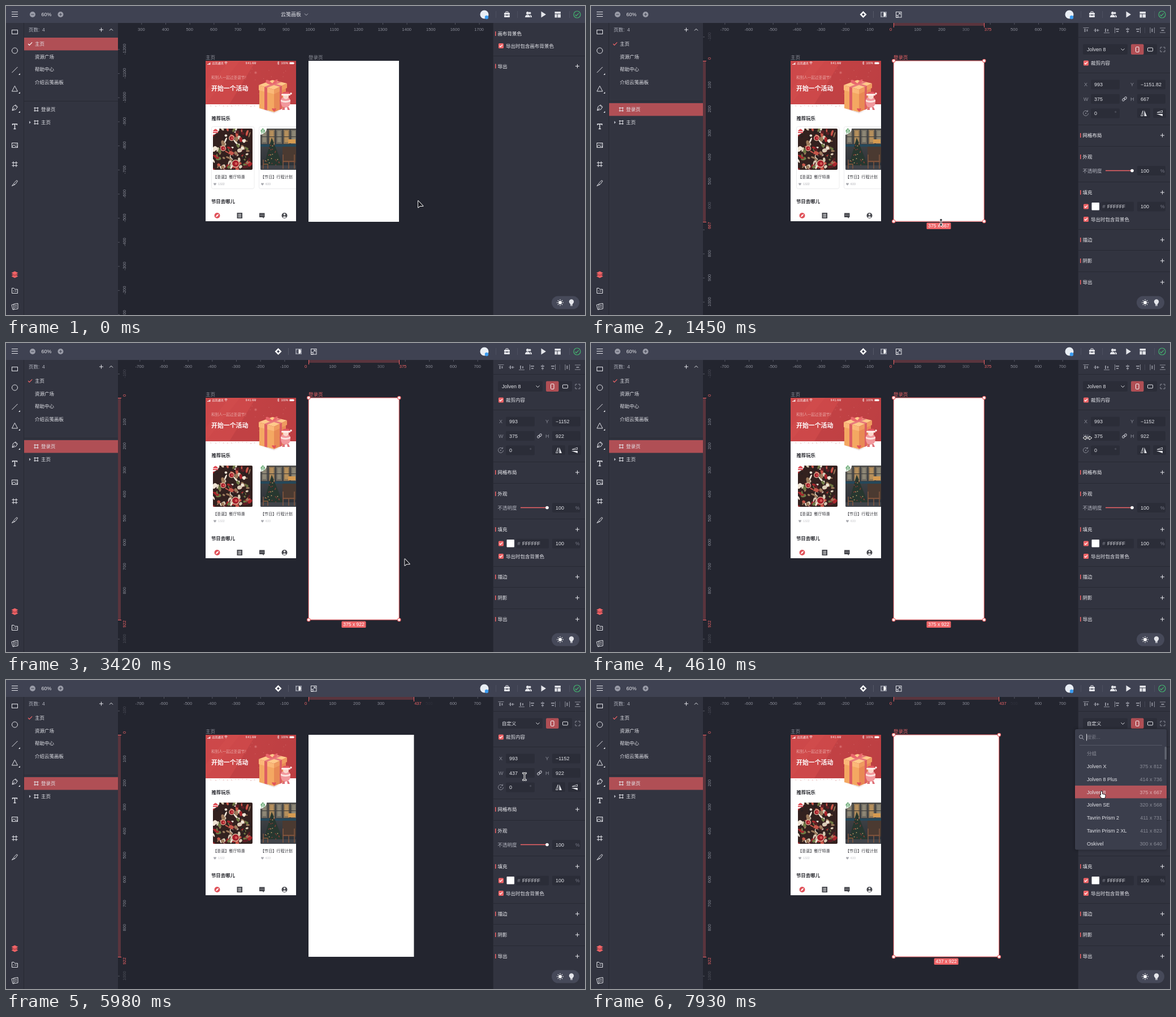
Write an HTML page with a canvas that moves like this. It is 1024x547 px and loops after 8 s.

```html
<!DOCTYPE html>
<html lang="zh-CN">
<head>
<meta charset="utf-8">
<style>
html, body { margin: 0; width: 100%; height: 100%; overflow: hidden; background: #23252f; }
canvas { display: block; }
</style>
</head>
<body>
<canvas id="stage" width="1024" height="547"></canvas>
<script>
const g = document.getElementById('stage').getContext('2d');
const FONT = '"Liberation Sans", "Noto Sans CJK SC", "Noto Sans CJK", sans-serif';
const LOOP = 8000, SCALE = 160 / 375, LEFT = 535, TOP = 97;
const RED = '#ef6467', ROW = '#b04f55', STRIP = '#5a343d', PANEL = '#323440', BAR = '#3f4252',
  BOARD = '#23252f', FIELD = '#2b2d38', EDGE = '#272933', INK = '#e4e5ea', DIM = '#8b8d98';

const STEPS = [0, 150, 300, 450, 600, 750, 950, 1150, 1300, 1450, 1900, 2050, 2230, 2430, 2610,
  3090, 3240, 3390, 3540, 3710, 3860, 4010, 4160, 4610, 4760, 4910, 5060, 5210, 5380, 5530,
  5980, 6130, 6280, 6430, 6580, 6730, 7030, 7180, 7330, 7480, 7630, 7780, 7930];
// time, x, y, shape
const CURSOR = [[0, 729, 345, 'arrow'], [600, 630, 330, 'arrow'], [950, 618, 372, 'arrow'],
  [1150, 619, 384, 'tall'], [1450, 619, 383, 'tall'], [1900, 620, 392, 'tall'], [2430, 631, 488, 'tall'],
  [2610, 631, 492, 'tall'], [3090, 636, 487, 'arrow'], [3540, 740, 330, 'arrow'], [4010, 872, 171, 'wide'],
  [4160, 872, 169, 'wide'], [4610, 878, 168, 'wide'], [5530, 917, 169, 'wide'], [5980, 917, 171, 'text'],
  [6280, 924, 128, 'arrow'], [6730, 922, 85, 'hand'], [7030, 922, 85, 'hand'], [7930, 905, 203, 'hand']];
const HEIGHT = [[0, 667], [1450, 667], [1900, 688], [2430, 912], [2610, 922]];
const WIDTH = [[0, 375], [4610, 375], [5530, 437]];
const DEVICES = [['Jolven X', '375 x 812'], ['Jolven 8 Plus', '414 x 736'], ['Jolven 8', '375 x 667'],
  ['Jolven SE', '320 x 568'], ['Tavrin Prism 2', '411 x 731'], ['Tavrin Prism 2 XL', '411 x 823'],
  ['Oskivel', '300 x 640']];

function track(keys, t, col = 1) {
  let i = 0;
  while (i < keys.length - 1 && keys[i + 1][0] <= t) i++;
  const a = keys[i], b = keys[i + 1];
  return b ? a[col] + (b[col] - a[col]) * (t - a[0]) / (b[0] - a[0]) : a[col];
}
function rect(x, y, w, h, c) { g.fillStyle = c; g.fillRect(x, y, w, h); }
function box(x, y, w, h, r, c, line) {
  g.beginPath(); g.roundRect(x, y, w, h, r);
  paint(c, line);
}
function disc(x, y, r, c, line) {
  g.beginPath(); g.arc(x, y, r, 0, 7);
  paint(c, line);
}
function paint(c, line) {
  if (line) { g.strokeStyle = c; g.lineWidth = line; g.stroke(); } else { g.fillStyle = c; g.fill(); }
}
function path(d, c, line, x = 0, y = 0) {
  const p = new Path2D(d);
  g.save(); g.translate(x, y);
  if (line) { g.strokeStyle = c; g.lineWidth = line; g.stroke(p); } else { g.fillStyle = c; g.fill(p); }
  g.restore();
}
function text(s, x, y, c = INK, size = 8.5, align = 'left', weight = 400) {
  g.font = `${weight} ${size}px ${FONT}`;
  g.textAlign = align; g.fillStyle = c;
  g.fillText(s, x, y + size * 0.36);
}
function clip(x, y, w, h, r, draw) {
  g.save(); g.beginPath(); g.roundRect(x, y, w, h, r); g.clip();
  draw(); g.restore();
}
function blend(x0, y0, x1, y1, ...colors) {
  const b = g.createLinearGradient(x0, y0, x1, y1);
  colors.forEach((c, i) => b.addColorStop(i / (colors.length - 1), c));
  return b;
}
function random(seed) {
  return () => (seed = seed * 16807 % 2147483647) / 2147483647;
}
const plus = (x, y) => path('M-3.5 0H3.5M0-3.5V3.5', INK, 1, x, y);
const chevron = (x, y, c = INK) => path('M-3-1.5L0 1.5L3-1.5', c, 1, x, y);
const tick = (x, y, c, k = 1) => path(`M${-3 * k} 0L${-k} ${2.2 * k}L${3.4 * k} ${-2.4 * k}`, c, 1.2, x, y);
const frameIcon = (x, y, s, c) => path(`M${-s} -2.5H${s}M${-s} 2.5H${s}M-2.5 ${-s}V${s}M2.5 ${-s}V${s}`, c, 1, x, y);

function checkbox(y, label) {
  box(871, y - 4.5, 9, 9, 1.5, RED);
  tick(875.3, y, '#fff', 0.8);
  if (label) text(label, 884, y);
}
function heading(y, label, add = true) {
  rect(865, y - 4, 1.5, 8, RED);
  text(label, 869.5, y, '#f4f4f7', 8.5, 'left', 500);
  if (add) plus(1010.5, y);
}
const divider = (...ys) => ys.forEach(y => rect(861, y, 163, 1, EDGE));

function ruler(vertical, zero, end) {
  const place = v => zero + v * SCALE;
  const label = (s, p, c) => {
    g.save();
    if (vertical) { g.translate(209, p); g.rotate(-Math.PI / 2); text(s, 0, 0, c, 7.5, 'center'); }
    else text(s, p, 41, c, 7.5, 'center');
    g.restore();
  };
  const stop = place(end);
  for (let v = -1900; v <= 1900; v += 100) {
    const p = place(v);
    if (p < (vertical ? 48 : 215) || p > 1024) continue;
    let a = vertical && p < 60 ? 0.4 : 1;
    // labels fade out close to the ends of the selection
    if (end) a *= Math.min(1, Math.max(0, (Math.min(Math.abs(p - zero), Math.abs(p - stop - 4)) - 20) / 22));
    g.globalAlpha = a;
    label(v, p, DIM);
    g.globalAlpha = 1;
    vertical ? rect(198, p, 3, 1, '#555763') : rect(p, 30, 1, 3, '#555763');
  }
  if (!end) return;
  if (vertical) {
    rect(198, zero, 5, stop - zero, STRIP);
    for (const y of [zero, Math.round(stop)]) rect(198, y, 6, 1, RED);
  } else {
    rect(zero, 30, stop - zero, 5, STRIP);
    for (const x of [zero, Math.round(stop)]) rect(x, 30, 1, 8, RED);
  }
  label('0', zero - (vertical ? 4 : 5), RED);
  label(end, stop + 7, RED);
}

function foodPhoto() {
  rect(366, 217, 70, 73, '#33211f');
  const r = random(77);
  const tones = ['#a9262c', '#d9cbb5', '#2b1f20', '#6f7a45', '#c8574a', '#efe4d4', '#5c1d24', '#9c7a5c'];
  for (let i = 0; i < 120; i++) {
    g.beginPath();
    g.ellipse(366 + r() * 70, 217 + r() * 73, 1.5 + r() * 4, 1 + r() * 2.5, r() * 3, 0, 7);
    paint(tones[i % 8]);
  }
  for (const [x, y, s] of [[399, 234, 5], [406, 279, 7], [384, 252, 5]]) {
    disc(x, y, s, '#e2c5a6'); disc(x, y, s - 1.2, '#a51e2b'); disc(x + 1, y, s / 3, '#d65a55');
  }
}
function streetPhoto() {
  rect(450, 217, 63, 73, blend(0, 217, 0, 290, '#4a4a49', '#3b3e42', '#2a2f36'));
  for (let i = 0; i < 5; i++) {
    rect(452 + i * 13, 219, 10, 25, i % 2 ? '#8d7454' : '#6f6a60');
    rect(454 + i * 13, 221, 6, 20, i % 2 ? '#b58f5c' : '#8c8675');
    rect(452 + i * 13, 231, 10, 1, '#39393a');
  }
  rect(450, 245, 63, 4, '#25485a');
  rect(489, 249, 24, 28, '#4b3a31'); rect(499, 236, 13, 7, '#d59a50');
  path('M470 233L455 286H491Z', '#27372f');
  const r = random(15);
  for (let i = 0; i < 26; i++) {
    const y = 244 + r() * 40;
    disc(471 + (r() - 0.5) * (y - 233) * 0.6, y, 0.9, i % 3 ? '#933c35' : '#c6a36c');
  }
  rect(450, 282, 63, 8, '#404349');
  path('M490 263V288M490 275H500V288M510 263V288M501 275H510M455 272V288M455 280H463V288', '#8e5b40', 1.3);
}
function gift() {
  path('M448 147L474 155V188L448 181Z', '#f4a862');
  path('M474 155L495 145V179L474 188Z', '#e88a55');
  path('M447 140L471 131L497 137L474 148Z', '#ffc98a');
  path('M447 140L474 148V156L447 149Z', '#fbb878');
  path('M474 148L497 137V145L474 156Z', '#ef9b60');
  path('M457 143L462 144.5V185L457 183.5ZM484 143L488 141V182L484 184Z', '#dd5f63');
  path('M457 143L482 133.5L487 135L462 144.5ZM459 135.5L463 134L488 141L484 143Z', '#e8797b');
  path('M471 139C458 140 457 129 463 131C468 133 470 137 471 139C474 129 483 128 480 133C478 137 475 138 471 139Z', '#e9676c');
  path('M486 168Q486 161 494 161Q503 161 503 169Q503 180 494 180Q486 180 486 168Z', '#f2989c');
  path('M486 166Q494 170 503 166V169Q494 173 486 169Z', '#fbe3df');
  disc(495, 160, 5, '#fbd8cd');
  path('M488 157Q489 151 496 152Q502 151 502 157Z', '#e1585f');
  box(487, 155.5, 16, 3, 1.5, '#fff4f0');
  disc(504, 155, 1.7, '#fff4f0');
  path('M490 179H493V184H488ZM497 179H500L502 184H498Z', '#de7077');
  path('M447 181L474 190L486 185L474 188Z', '#eadfe0');
  path('M474 187q-3-3-4-5q2-2 4 0q2-2 4 0q-1 3-4 5', '#e3545a');
}
function phone(t) {
  text('主页', 353, 91, '#8f919b');
  rect(353, TOP, 160, 284, '#fff');
  clip(353, TOP, 160, 284, 0, () => {
    rect(353, TOP, 160, 77, blend(353, 97, 513, 150, '#cd484a', '#cd4849', '#c54447'));
    path('M442 97H513V174H395Z', 'rgba(176,56,62,.4)');
    path('M353 150L395 97H414L353 174Z', 'rgba(222,90,88,.14)');
    const r = random(9);
    for (let i = 0; i < 16; i++) disc(432 + r() * 78, 108 + r() * 55, 0.5, '#d97a79');
    path('M439 118h5M441.5 115.5v5M439.7 116.2l3.6 3.6M443.3 116.2l-3.6 3.6', '#dd7d7d', 0.6);
    for (let i = 0; i < 12; i++) rect(360 + i * 7 + r() * 3, 175 + r() * 2, 2.4, 1 + r(), '#f0d3d2');

    for (let i = 0; i < 4; i++) rect(356 + i * 1.5, 103 - i, 1, 1 + i, '#fff');
    text('远岚通讯', 364.5, 101, '#fff', 5);
    path('M386.5 100Q389 97.5 391.5 100M387.5 101.5Q389 100 390.5 101.5M388.5 103H389.5', '#fff', 0.9);
    text('9:41 AM', 433, 101, '#fff', 5, 'center');
    path('M480 99.5L483 102.5L481.5 104V98L483 99.5L480 102.5', '#fff', 0.6);
    text('100%', 486.5, 101, '#fff', 5);
    box(501.5, 99.5, 7.5, 3.5, 0.6, '#fff'); rect(509.5, 100.5, 0.8, 1.5, '#fff');

    text('和别人一起过圣诞节！', 363, 127, '#eaa9a7', 6.6);
    text('开始一个活动', 363, 146, '#fff', 10.9, 'left', 700);
    gift();
    text('推荐玩乐', 363.5, 199, '#23242a', 8.4, 'left', 700);
    for (const [x, c, name, likes] of [[363, '#e0525a', '【圣诞】餐厅特惠', '1322'], [447, '#4f9a5c', '【节日】行程计划', '633']]) {
      if (t < 1900) box(x + 0.5, 213.5, 75.5, 110, 3, '#ececee', 1);
      clip(x + 3, 217, 70, 73, 2, x < 400 ? foodPhoto : streetPhoto);
      path('M0 0H12Q11 10 0 12Z', '#fff', 0, x + 2.5, 216);
      if (x < 400) path('M366 222Q367 218.5 370.5 217.5Q374 218.5 375 222ZM366 223H375V225H366Z', c);
      else {
        box(451.5, 218.5, 5.5, 5.5, 1.5, c, 1);
        rect(450.5, 220.5, 7.5, 1.5, c); rect(453, 217, 2.5, 1, c);
        rect(451.5, 224.5, 1.5, 1.2, c); rect(455.5, 224.5, 1.5, 1.2, c);
      }
      text(name, x + 3, 302, '#34353b', 7.1);
      path('M0 2.7C-4-.5-2-3 0-1.2C2-3 4-.5 0 2.7', '#a9aab0', 0, x + 6.5, 315);
      text(likes, x + 12, 315, t < 1900 ? '#abacb2' : '#c0c1c6', 5.3);
    }
    text('节日去哪儿', 363, 346, '#23242a', 8.4, 'left', 700);
    disc(373.5, 371, 5, '#e0525a'); path('M3-3L-1-1L-3 3L1 1Z', '#fff', 0, 373.5, 371);
    rect(408.5, 366, 9.5, 10, '#46474d');
    for (const y of [368.3, 370.6, 373]) rect(410.5, y, 5.5, 1, '#fff');
    path('M448 366.5H457.5V374H456V376L453.5 374H448Z', '#46474d');
    for (const x of [450, 452.3, 454.6]) rect(x, 369.7, 1, 1, '#fff');
    disc(492.5, 371, 5, '#46474d'); disc(492.5, 369, 1.7, '#fff');
    path('M489.3 374Q492.5 370.5 495.7 374Q492.5 376 489.3 374Z', '#fff');
  });
}

function artboard(t, w, h, picked) {
  const W = w * SCALE, H = h * SCALE, R = LEFT + W, B = TOP + H;
  const handles = picked && (t < 4760 || t >= 6130);
  if (!picked || handles) text('登录页', LEFT, 91, picked ? RED : '#8f919b');
  rect(LEFT, TOP, W, Math.round(H), '#fff');
  if (!handles) return;
  g.strokeStyle = RED; g.lineWidth = 1;
  g.strokeRect(LEFT + 0.2, TOP, W, H - 0.4);
  for (const x of [LEFT, R]) for (const y of [TOP, B - 0.4]) { disc(x + 0.3, y, 2.7, '#fff'); disc(x + 0.3, y, 2.7, RED, 1.1); }
  box(LEFT + W / 2 - 21.5, B + 2, 43, 11.5, 1.5, RED);
  text(`${w} x ${h}`, LEFT + W / 2, B + 7.8, '#fff', 8.5, 'center');
}

function leftSide(picked) {
  rect(0, 30, 198, 517, PANEL);
  rect(31, 30, 1, 517, EDGE);
  g.strokeStyle = INK; g.lineWidth = 1;
  g.strokeRect(10.5, 42.5, 10, 7);
  disc(15.5, 79, 5, INK, 1);
  path('M10.5 118L20.5 108', INK, 1);
  path('M15.5 141.5L20.5 151H10.5Z', INK, 1);
  path('M11 185L12.5 178L17 175L20.5 178.5L17.5 183ZM11 185L15.5 180.5M16 176L20 180', INK, 1);
  for (const y of [122, 155, 189]) path('M25 0V-3L22 0Z', INK, 0, 0, y);
  path('M11.5 211V209H19.5V211M15.5 209V217.5M13.5 217.5H17.5', INK, 1.4);
  g.lineWidth = 1;
  g.strokeRect(10.5, 242.5, 10, 8); path('M11 249L14 245.5L17 249L18.5 247.5L20.5 250', INK, 1); disc(18, 244.7, 0.8, INK);
  frameIcon(15.5, 280, 5, INK);
  path('M10.5 318.5L13.5 314.5L16 316ZM14 313.5L19 308.5L20.5 310L16.5 315.5', INK, 1);
  for (const y of [478.5, 475.5, 472.5]) path('M-6 0L0-3L6 0L0 3Z', y === 475.5 ? '#c94d52' : RED, 0, 15.5, y);
  path('M10.5 508.5V499.5H14L15.5 501.5H20.5V508.5ZM13 504.5H14.5M16 504.5H18.5', INK, 1);
  path('M14 527.5L21 526.5V536L14 537ZM14 528L10 529L12 537.5H14M16 530H19M16 533H19', INK, 1);

  text('页数:  4', 40, 42, '#b4b6c0');
  plus(168.5, 42); path('M183 43.5L186 40.5L189 43.5', INK, 1);
  rect(32, picked ? 172 : 56, 166, 22.5, ROW);
  tick(42.5, 67, picked ? RED : '#fff', 1.1);
  ['主页', '资源广场', '帮助中心', '介绍云笺画板'].forEach((s, i) => text(s, 51, 67 + i * 22.7));
  rect(32, 168, 166, 1, EDGE);
  frameIcon(53.5, 183, 4, INK); text('登录页', 62, 183);
  frameIcon(53.5, 206, 4, INK); text('主页', 62, 206);
  path('M41 203.5L44 206L41 208.5Z', '#b4b6c0');
}

function topBar(picked) {
  rect(0, 0, 1024, 30, BAR);
  for (const y of [10, 14, 18]) rect(10, y, 11, 1, INK);
  for (const x of [47, 96.5]) {
    disc(x, 15, 5, '#9a9ca8'); rect(x - 2.5, 14.5, 5, 1, BAR);
    if (x > 50) rect(x - 0.5, 12.5, 1, 5, BAR);
  }
  text('60%', 71.5, 15, INK, 9, 'center');
  if (picked) {
    path('M481.5 9L487.5 15L481.5 21L475.5 15ZM481.5 12.5L479 15L481.5 17.5L484 15Z', '#fff');
    rect(499, 9, 1, 12, '#565968');
    rect(512, 10, 11, 10, '#8f929f');
    disc(517.5, 15, 4, '#4a4d5c'); path('M517.5 11A4 4 0 0 1 517.5 19Z', '#fff');
    g.strokeStyle = INK; g.lineWidth = 1; g.strokeRect(539.5, 10.5, 9.5, 9.5);
    g.strokeRect(539.5, 16.5, 3.5, 3.5);
    path('M543.5 15.5L547 12.5M544 12.5H547V15.5', INK, 1);
  } else {
    text('云笺画板', 504, 15, INK, 9, 'center'); chevron(531, 15, '#b4b6c0');
  }
  disc(846, 15, 7.5, '#e9eef4'); disc(850, 20, 3.2, '#3c9cf0');
  for (const x of [866, 904, 996]) rect(x, 9, 1, 12, '#4d5060');
  box(881, 12, 10, 8, 1, INK); path('M884 12V10H888V12', INK, 1); rect(881, 15.5, 10, 0.8, BAR); rect(885, 15, 2, 2, BAR);
  disc(922.5, 12.5, 2.5, INK); disc(926.5, 12.5, 2, INK);
  path('M918 20Q918 15.5 922.5 15.5Q927 15.5 927 20ZM927.5 20H930Q930 16 926.5 15.5Q928 17.5 927.5 20Z', INK);
  path('M946.5 9.5L955 15L946.5 20.5Z', INK);
  rect(970.5, 10, 10.5, 3.5, INK); rect(970.5, 14.5, 4, 6, INK); rect(975.5, 14.5, 5.5, 6, INK);
  disc(1010, 15, 6, '#43b26f', 1.2); tick(1009.5, 15.3, '#43b26f');
}

function field(x, y, w, value, unit) {
  box(x, y - 8.5, w, 17, 2, FIELD);
  text(value, x + 6, y, INK, 9);
  if (unit) text(unit, x + w - 9, y, '#777986', 8.5);
}
function alignIcons() {
  const bars = (d, x) => path(d, DIM, 1, x, 43);
  const blocks = (d, x) => path(d, DIM, 0, x, 43);
  [-4.5, 0, 4.5].forEach((shift, i) => {
    bars(`M-5 ${shift}H5`, [875.5, 894, 912][i]);
    blocks('M-3-3H-1V3H-3ZM1-2H3V2H1Z', [875.5, 894, 912][i]);
    bars(`M${shift}-5V5`, [931, 949, 967][i]);
    blocks('M-3-3H3V-1H-3ZM-2 1H2V3H-2Z', [931, 949, 967][i]);
  });
  bars('M-3.5-5V5M4-5V5', 992.5); blocks('M-1-3H1V3H-1Z', 992.5);
  bars('M-5-4H5M-5 4H5', 1011); blocks('M-2.5-1H2.5V1H-2.5Z', 1011);
  rect(979, 38, 1, 10, '#454755');
}
function inspector(t, w, h) {
  alignIcons();
  divider(55, 118, 210, 248, 311, 395, 432, 470);
  const preset = w === 375;
  box(870, 67.5, 79, 18.5, 2, FIELD);
  text(preset ? 'Jolven 8' : '自定义', 877, 77, INK, preset ? 9 : 8.5);
  chevron(940.5, 77);
  box(955, 67.5, 46, 18.5, 2, FIELD); box(955, 67.5, 22.5, 18.5, 2, ROW);
  box(963.5, 72.5, 5.5, 9, 1, '#fff', 1); box(984.5, 74, 9, 6, 1, INK, 1);
  path('M1007 76V73H1010M1012 73H1015V76M1015 78V81H1012M1010 81H1007V78', DIM, 1);
  checkbox(101, '裁剪内容');
  for (const [s, x, y] of [['X', 872, 139], ['Y', 954, 139], ['W', 871, 164.5], ['H', 954, 164.5]]) text(s, x, y, DIM, 9);
  field(884, 139, 51, '993'); field(966, 139, 50, t < 1900 ? '−1151.82' : '−1152');
  field(884, 164.5, 51, w); field(966, 164.5, 50, h);
  g.save(); g.translate(943.5, 164.5); g.rotate(-0.7);
  box(-4.5, -1.7, 5, 3.4, 1.7, '#c5c6ce', 1); box(-0.5, -1.7, 5, 3.4, 1.7, '#c5c6ce', 1); g.restore();
  path('M878 186.5A4.5 4.5 0 1 0 879.5 190M878.5 184.5V187H876', DIM, 1); disc(875, 190, 1, DIM);
  field(884, 190, 51, '0', '°');
  box(966, 181, 23, 17, 2, FIELD); box(994, 181, 23, 17, 2, FIELD);
  path('M976 185.5V194.5H972.5Z', INK, 0.8); path('M978.5 184.5V195H983Z', INK);
  path('M1010.5 188.5H1001L1010.5 185Z', INK, 0.8); path('M1011 191H1000L1011 195Z', INK);
  heading(229, '网格布局'); heading(267, '外观', false);
  text('不透明度', 869.5, 291.5, '#b4b6c0');
  rect(910, 290.7, 47, 1.5, RED); disc(957, 291.5, 2.8, '#fff');
  field(966, 291.5, 50, '100', '%');
  heading(330, '填充');
  checkbox(355);
  box(885.5, 348, 13.5, 13.5, 1, '#fff');
  box(902, 346.5, 58, 17, 2, FIELD); text('#', 904.5, 355, DIM, 9); text('FFFFFF', 913, 355, INK, 8.7);
  field(966, 355, 50, '100', '%');
  checkbox(377.5, '导出时包含背景色');
  heading(414, '描边'); heading(451, '阴影'); heading(489, '导出');
}
function rightSide(t, w, h, picked) {
  rect(861, 30, 163, 517, PANEL);
  rect(861, 30, 1, 517, EDGE);
  if (picked) inspector(t, w, h);
  else {
    heading(49, '画布背景色', false); checkbox(70.5, '导出时包含画布背景色');
    divider(88); heading(106.5, '导出');
  }
  box(965, 513.5, 49, 23, 11.5, '#464959');
  disc(980, 525, 3, '#fff');
  for (let i = 0; i < 8; i++) disc(980 + 5 * Math.cos(i * Math.PI / 4), 525 + 5 * Math.sin(i * Math.PI / 4), 0.8, '#fff');
  disc(1000, 523.5, 4.2, INK); rect(998, 527, 4, 2, INK); rect(998, 529.7, 4, 1.2, INK);
}

function menu(pointerY) {
  g.save(); g.shadowColor = 'rgba(0,0,0,.4)'; g.shadowBlur = 5;
  box(856, 87, 162, 213.5, 3, '#3b3e4c'); g.restore();
  disc(866.5, 100.5, 3, '#b4b6c0', 1); path('M869 103L871.5 105.5', '#b4b6c0', 1);
  rect(876, 95.5, 1, 12, INK); text('搜索...', 876.5, 101, '#777986');
  rect(864, 115, 146, 1, '#555866');
  text('分组', 877, 130, DIM);
  const hover = Math.floor((pointerY - 5 - 141.1) / 22.8);
  if (hover >= 0) rect(856, 141.3 + hover * 22.8, 162, 22.5, '#b2535a');
  DEVICES.forEach(([name, size], i) => {
    const y = 152.7 + i * 22.8;
    text(name, 877, y, INK, 9);
    text(size, 1010, y, i === hover ? '#dfb4b8' : DIM, 9, 'right');
  });
  box(1014.5, 118, 3.5, 23, 1.7, '#60636f');
}

const SHAPES = {
  arrow: 'M0 0V11.5L3 9H8.5Z',
  tall: 'M0-6.5L2.5-3.5H.6V3.5H2.5L0 6.5L-2.5 3.5H-.6V-3.5H-2.5Z',
  wide: 'M-7 0L-3.5-2.5V-.6H3.5V-2.5L7 0L3.5 2.5V.6H-3.5V2.5Z',
  text: 'M-3-6.5H-1L0-5.5L1-6.5H3V-5.5H1L.6-5V5L1 5.5H3V6.5H1L0 5.5L-1 6.5H-3V5.5H-1L-.6 5V-5L-1-5.5H-3Z',
  hand: 'M-3-5Q-2-7-1-5V-1L3.5 0Q5 .5 4.500 3L3.5 6H-2L-5 1.5Q-4 0-3 1.5Z'
};
function cursor(t, x, y) {
  const kind = CURSOR.filter(k => k[0] <= t).pop()[3];
  const light = kind === 'hand';
  g.lineJoin = 'round';
  path(SHAPES[kind], light ? '#22232a' : '#fff', 1.8, x, y);
  path(SHAPES[kind], light ? '#fff' : '#191a20', 0, x, y);
  g.lineJoin = 'miter';
}

function draw(now) {
  const clock = now % LOOP;
  const t = STEPS.filter(s => s <= clock).pop();
  const w = Math.round(track(WIDTH, t)), h = Math.round(track(HEIGHT, t));
  const x = track(CURSOR, t), y = track(CURSOR, t, 2);
  const picked = t >= 600;
  rect(0, 0, 1024, 547, BOARD);
  if (picked) { ruler(false, LEFT, w); ruler(true, TOP, h); }
  else { ruler(false, LEFT - 993 * SCALE); ruler(true, TOP + 1151.82 * SCALE); }
  phone(t);
  artboard(t, w, h, picked);
  leftSide(picked);
  rightSide(t, w, h, picked);
  topBar(picked);
  if (t >= 7030) menu(y);
  cursor(t, x, y);
  requestAnimationFrame(draw);
}
requestAnimationFrame(draw);
</script>
</body>
</html>
```
